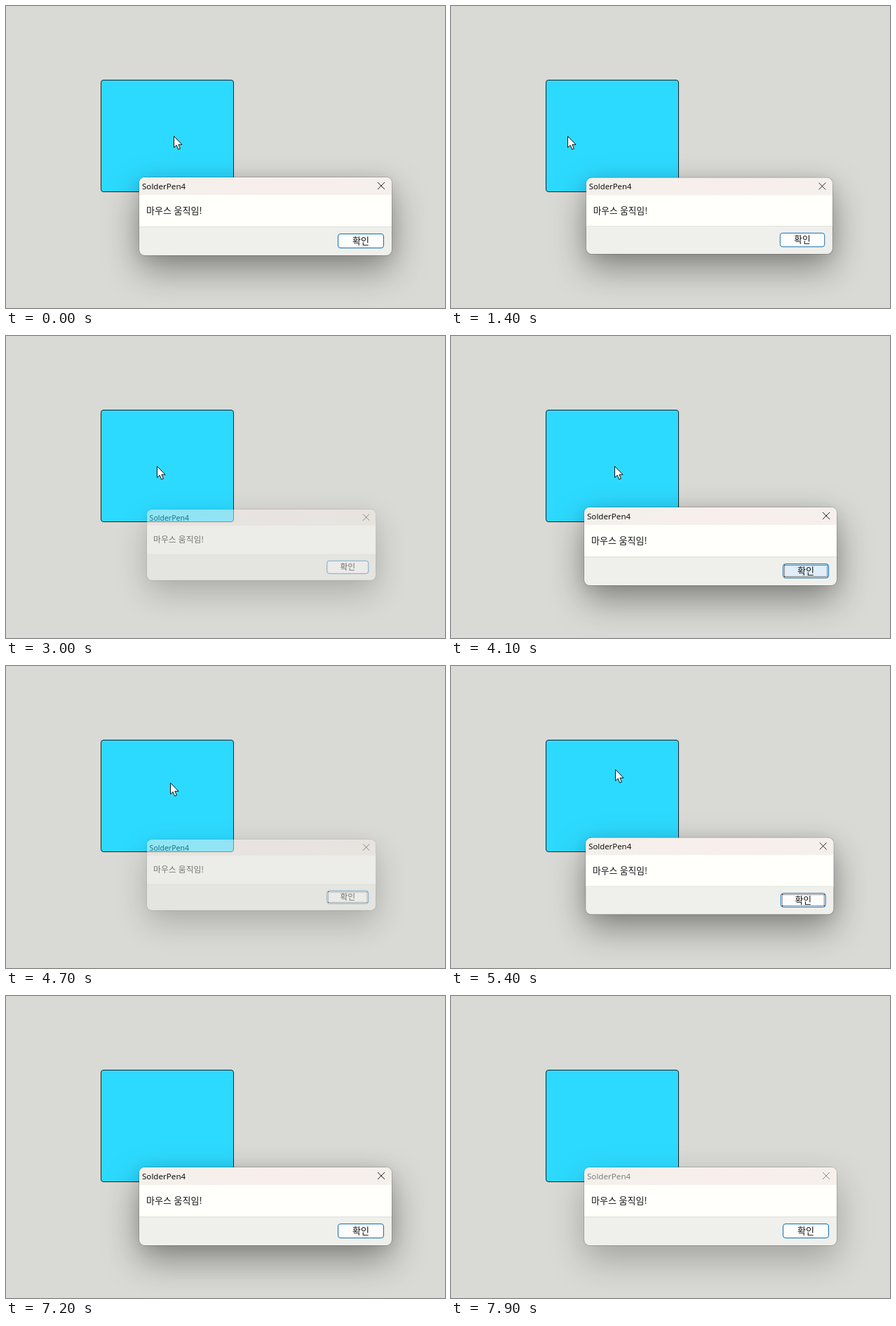
These frames come from a looping animation (626x430 px, 8 s). An HTML page:

```html
<!DOCTYPE html>
<html lang="ko">
<head>
<meta charset="utf-8">
<title>Mouse move alert</title>
<style>
html, body { margin: 0; width: 100%; height: 100%; overflow: hidden; background: #d9d9d5; }
div, svg { position: absolute; box-sizing: border-box; }
div { white-space: nowrap; }
#panel { left: 135px; top: 105px; width: 190px; height: 160px; background: #2ddaff; border: 1px solid #222; border-radius: 4px; }
#dialog { left: 190px; top: 244px; width: 360px; height: 111px; border-radius: 8px; transform-origin: 117px 34px;
  background: #eff0ec; color: #111; font: 13px/20px "Noto Sans CJK KR", "Noto Sans CJK", sans-serif;
  box-shadow: 0 0 0 1px rgba(0,0,0,.16), 0 2px 20px rgba(0,0,0,.08), 0 20px 50px rgba(0,0,0,.4); }
#bar { left: 0; top: 0; width: 100%; height: 25px; border-radius: 8px 8px 0 0; background: linear-gradient(90deg, #f3f0ea, #f8eeec 60%, #f5f0ec); }
#title { left: 4px; top: 3px; font: 11.6px/20px "Noto Sans", "Open Sans", sans-serif; }
#body { left: 0; top: 25px; width: 100%; height: 46px; background: #fffffb; border-bottom: 1px solid #dfdfdc; }
#text { left: 10px; top: 12px; }
#ok { left: 283px; top: 80px; width: 66px; height: 21px; border: 1px solid #0f6cb4; border-radius: 4px; background: #fdfdfd; text-align: center; line-height: 18px; }
#focus { inset: 1px; border: 1px dotted #111; }
#cross { left: 339px; top: 6px; }
.pressed #ok { background: #e0eef9; }
.inactive { box-shadow: 0 0 0 1px rgba(0,0,0,.16), 0 20px 50px rgba(0,0,0,.26) !important; }
.inactive #title, .inactive #cross { opacity: .5; }
#cursor { left: 0; top: 0; overflow: visible; }
</style>
</head>
<body>
<div id="panel"></div>
<div id="dialog">
  <div id="bar"></div>
  <div id="title">SolderPen4</div>
  <svg id="cross" width="12" height="12"><path d="M1 1L11 11M11 1L1 11" stroke="#222"/></svg>
  <div id="body"><div id="text">마우스 움직임!</div></div>
  <div id="ok">확인<div id="focus"></div></div>
</div>
<svg id="cursor" width="14" height="22"><path d="M.5 .5V16.5L4.2 13.2 6.7 19.2 9.4 18.1 6.9 12.3H12Z" fill="#fff" stroke="#111"/></svg>
<script>
const LOOP = 8000, STEP = 100;
const [dialog, focusRing, cursor] = ["dialog", "focus", "cursor"].map(id => document.getElementById(id));

// Each mouse move opens the alert; "keys" marks those answered from the keyboard.
const moves = [
  { open: -1000, close: 100, x: 239, y: 185, hide: 1000 },
  { open: 1289, close: 2600, x: 166, y: 185 },
  { open: 2995, close: 4200, x: 215, y: 185, drift: 18, keys: 3900 },
  { open: 4695, close: 5100, x: 234, y: 166, keys: 4695 },
  { open: 5267, close: 6000, x: 234, y: 147, keys: 5267, hide: 6300 },
  { open: 6411, close: LOOP + 100, x: 234, y: 159, hide: 7200 },
];

function drawDialog(t, { open, close, keys = Infinity }) {
  const age = t - open, closing = t >= close;
  const scale = closing ? .96 : 1 - .1 * Math.exp(-age / 80);
  dialog.style.visibility = t < close + STEP ? "visible" : "hidden";
  dialog.style.transform = scale > .999 ? "none" : `scale(${scale})`;
  dialog.style.opacity = closing ? .5 : Math.min(1, .45 + age / 100);
  dialog.classList.toggle("inactive", t >= LOOP - STEP);
  dialog.classList.toggle("pressed", t >= keys && t >= close - 200);
  focusRing.style.display = t >= keys ? "block" : "none";
}

function drawCursor(t, { open, x, y, drift = 0, hide = Infinity }) {
  const shift = Math.round(drift * Math.min(1, (t - open) / 200));
  cursor.style.display = t < hide ? "block" : "none";
  cursor.style.transform = `translate(${x + shift}px, ${y}px)`;
}

function frame() {
  const t = Math.floor(performance.now() % LOOP / STEP) * STEP;
  const move = moves.findLast(m => m.open <= t);
  drawDialog(t, move);
  drawCursor(t, move);
  requestAnimationFrame(frame);
}
frame();
</script>
</body>
</html>
```
